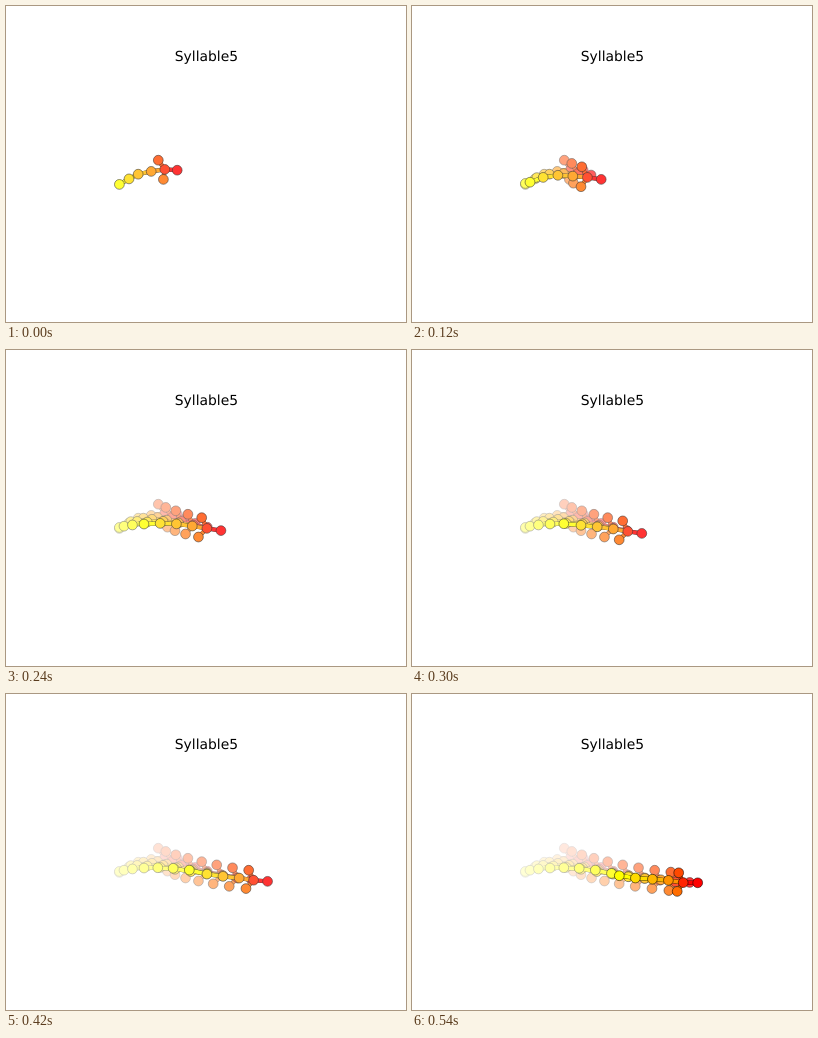
An HTML page with a canvas for the animation above (600 ms loop, 400x316 px).

```html
<!DOCTYPE html>
<html lang="en">
<head>
<meta charset="utf-8">
<style>
  html, body { margin: 0; width: 100%; height: 100%; overflow: hidden; background: #fff; }
  canvas { display: block; }
</style>
</head>
<body>
<canvas id="stage" width="400" height="316"></canvas>
<script>
const ctx = document.getElementById('stage').getContext('2d');
const STEP_MS = 60;
const STEPS = 10;
const NODE_RADIUS = 4.9;
const LINE_WIDTH = 4.17;
const VEIL = 0.2;

// The walk is captured at four moments; the last step is a half stride
const KEY_TIMES = [0, 2, 5, 8.5];
const END_TIME = KEY_TIMES[3];

// Where each body part is at the key times
const body = {
  tailTip:  { x: [113.4, 118, 151.8, 207.3],   y: [178.4, 176.2, 173.7, 181.7] },
  tailMid:  { x: [123, 131.2, 169, 223.4],     y: [172.9, 171.4, 175.3, 184] },
  tailBase: { x: [132.2, 145.9, 185.2, 240.4], y: [168.2, 169.3, 176.8, 185.2] },
  back:     { x: [145.2, 160.8, 201.3, 256.4], y: [165.4, 170.1, 179, 186.4] },
  rightEar: { x: [157.4, 169, 207.2, 265.2],   y: [173.4, 180.7, 189.8, 197.4] },
  leftEar:  { x: [152.3, 169.8, 210.7, 266.7], y: [154.2, 160.8, 170.9, 178.8] },
  neck:     { x: [158.8, 175.4, 215.8, 271.2], y: [163.4, 171.4, 181.4, 188.6] },
  nose:     { x: [171.2, 189.2, 229.8, 285.7], y: [164.2, 173.4, 183.4, 188.8] }
};
const parts = Object.values(body);

const SPINE = ['tailTip', 'tailMid', 'tailBase', 'back', 'neck'];
const edges = [
  ...SPINE.slice(1).map((name, i) => [SPINE[i], name]),
  ...['rightEar', 'leftEar', 'nose'].map(name => [name, 'neck'])
].map(pair => pair.map(name => parts.indexOf(body[name])));

// Cubic through the four key values
function interpolate(values, time) {
  return values.reduce((sum, value, i) =>
    sum + KEY_TIMES.reduce((weight, key, j) =>
      j === i ? weight : weight * (time - key) / (KEY_TIMES[i] - key), value), 0);
}

function poseAt(step) {
  const time = Math.min(step, END_TIME);
  return parts.map(({ x, y }) => [interpolate(x, time), interpolate(y, time)]);
}

const poses = Array.from({ length: STEPS }, (_, step) => poseAt(step));

const nodeColor = i => `rgb(255, ${Math.round(255 * (1 - i / 7))}, 0)`;

function strokeEdge(from, to, color, width) {
  ctx.strokeStyle = color;
  ctx.lineWidth = width;
  ctx.beginPath();
  ctx.moveTo(...from);
  ctx.lineTo(...to);
  ctx.stroke();
}

function drawPose(pose) {
  for (const [a, b] of edges) {
    strokeEdge(pose[a], pose[b], '#000', LINE_WIDTH);
    strokeEdge(pose[a], pose[b], nodeColor(a), LINE_WIDTH * 0.9);
  }
  ctx.strokeStyle = '#000';
  ctx.lineWidth = 0.55;
  pose.forEach(([x, y], i) => {
    ctx.fillStyle = nodeColor(i);
    ctx.beginPath();
    ctx.arc(x, y, NODE_RADIUS, 0, 2 * Math.PI);
    ctx.fill();
    ctx.stroke();
  });
}

function fillStage(alpha) {
  ctx.fillStyle = `rgba(255, 255, 255, ${alpha})`;
  ctx.fillRect(0, 0, 400, 316);
}

function drawTitle() {
  ctx.fillStyle = '#000';
  ctx.font = '13.89px "DejaVu Sans", sans-serif';
  ctx.textRendering = 'geometricPrecision';
  ctx.fillText('Syllable5', 168.8, 55);
}

function render(step) {
  fillStage(1);
  // Each pose but the last is veiled, so older ones fade out
  for (let i = 0; i <= step; i++) {
    drawPose(poses[i]);
    if (i < STEPS - 1) fillStage(VEIL);
  }
  drawTitle();
}

const start = performance.now();
function tick() {
  const elapsed = performance.now() - start;
  render(Math.floor(elapsed / STEP_MS) % STEPS);
  requestAnimationFrame(tick);
}
tick();
</script>
</body>
</html>
```
